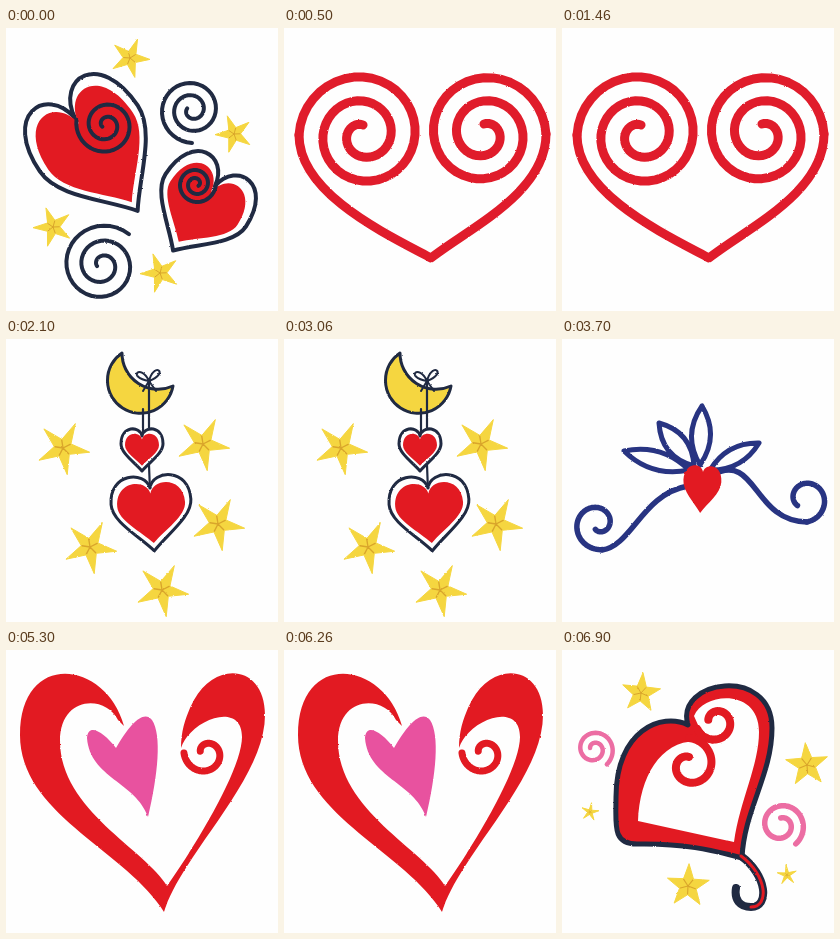
Recreate the animation shown at these times as an HTML page. Size 272 by 283 pixels, loop 8 s.

```html
<!DOCTYPE html>
<html lang="en">
<head>
<meta charset="utf-8">
<title>Embroidered hearts</title>
<style>
  html, body { margin: 0; width: 100%; height: 100%; overflow: hidden; background: #fefefe; }
  #strip { display: block; width: 1632px; height: 283px; animation: cut 8s step-end infinite; }
  path { stroke-linecap: round; stroke-linejoin: round; }
  @keyframes cut {
    0% { transform: translateX(0); }
    6.25% { transform: translateX(-272px); }
    26.25% { transform: translateX(-544px); }
    46.25% { transform: translateX(-816px); }
    66.25% { transform: translateX(-1088px); }
    86.25%, 100% { transform: translateX(-1360px); }
  }
</style>
</head>
<body>
<svg id="strip" viewBox="0 0 1632 283">
  <filter id="thread" x="0" y="0" width="272" height="283" filterUnits="userSpaceOnUse" color-interpolation-filters="sRGB">
    <feTurbulence type="fractalNoise" baseFrequency=".45" numOctaves="2" seed="4"/>
    <feDisplacementMap in="SourceGraphic" scale="1.8" xChannelSelector="R" yChannelSelector="G"/>
  </filter>
</svg>
<script>
const NS = 'http://www.w3.org/2000/svg';
const strip = document.getElementById('strip');
const INK = '#202a42', RED = '#e21a22', CRIMSON = '#e01c2b', BLUE = '#283482';
const PINK = '#ec6da3', GOLD = '#f5d640', WHITE = '#fefefe';
const rad = deg => deg * Math.PI / 180;
let scene;

function node(parent, tag, attrs) {
  const el = document.createElementNS(NS, tag);
  for (const k in attrs) el.setAttribute(k, attrs[k]);
  return parent.appendChild(el);
}

function newScene(i) {
  const slot = node(strip, 'g', { transform: `translate(${i * 272})` });
  scene = node(slot, 'g', { filter: 'url(#thread)' });
}

const shape = (d, color, edge = 'none', width = 0) =>
  node(scene, 'path', { d, fill: color, stroke: edge, 'stroke-width': width });
const line = (d, color, width) => shape(d, 'none', color, width);

// Radius shrinks evenly from r0 to r1; positive turns run clockwise.
function spiral(x, y, r0, r1, start, turns, color, width) {
  const pts = [];
  for (let i = 0; i <= 90; i++) {
    const t = i / 90, r = r0 + (r1 - r0) * t, a = rad(start + 360 * turns * t);
    pts.push(`${x + r * Math.cos(a)},${y + r * Math.sin(a)}`);
  }
  line('M' + pts.join('L'), color, width);
}

// Cleft at (x, y), half width w, cleft-to-tip height h.
function heart(x, y, w, h, turn, lift, color, edge, width, drop = 0) {
  const half = s => `C${s * w * 0.1},${-w * lift} ${s * w},${-w * lift} ${s * w},${h * 0.22}`
    + `C${s * w},${h * 0.5} ${s * w * 0.35},${h * 0.75} 0,${h}`;
  const el = shape(`M0,0${half(-1)}M0,0${half(1)}`, color, edge, width);
  el.setAttribute('transform', `translate(${x} ${y}) rotate(${turn}) translate(0 ${drop})`);
}

function framedHeart(x, y, w, h, turn, lift, gap, width) {
  heart(x, y, w, h, turn, lift, WHITE, INK, width);
  heart(x, y, w - gap, h - gap * 2.2, turn, lift, RED, 'none', 0, gap * 0.9);
}

// Five-pointed star with shaded facets.
function star(x, y, r, turn, inner = 0.35) {
  const at = (i, q) => {
    const a = rad(i * 36 - 90 + turn);
    return [x + q * Math.cos(a), y + q * Math.sin(a)];
  };
  let d = '', folds = '';
  for (let i = 0; i < 10; i++) {
    d += (i ? 'L' : 'M') + at(i, i % 2 ? r * inner : r);
    if (i % 2) folds += `M${x},${y}L${at(i, r * inner * 0.9)}`;
  }
  shape(d + 'Z', GOLD, GOLD, 1);
  line(folds, '#d9a52b', r / 20);
}

// Lens between base and tip.
function petal(bx, by, tx, ty, w) {
  const len = Math.hypot(tx - bx, ty - by);
  const nx = (by - ty) / len * w, ny = (tx - bx) / len * w;
  const mx = (bx + tx) / 2, my = (by + ty) / 2;
  shape(`M${bx},${by}Q${mx + nx},${my + ny} ${tx},${ty}Q${mx - nx},${my - ny} ${bx},${by}Z`, WHITE, BLUE, 5);
}

// Two hearts, two spirals, four stars
newScene(0);
star(124, 30, 20, 22);
star(228, 106, 19, -20);
star(47, 199, 20, -20);
star(154, 245, 20, -20);
framedHeart(69, 90, 59, 112, -34, 0.74, 8, 4);
spiral(100, 97, 30, 4, 190, -2.1, INK, 4);
framedHeart(209, 158, 48, 77, 33, 0.7, 8, 4);
spiral(190, 156, 20, 3, 0, 2.1, INK, 4);
spiral(186, 82, 33, 5, 90, 2.3, INK, 4);
spiral(96, 237, 41, 5, -49, -2.4, INK, 4);

// One heart made of two mirrored spirals
newScene(1);
spiral(79, 107, 64, 10, 180, 2.25, CRIMSON, 9);
spiral(200, 106, 62, 10, 0, -2.25, CRIMSON, 9);
line('M15,107C15,165 100,205 147,230C185,200 262,165 262,106', CRIMSON, 9);

// Moon mobile with hanging hearts
newScene(2);
for (const [x, y] of [[57, 109], [197, 105], [84, 208], [212, 185], [156, 251]]) star(x, y, 27, 27, 0.33);
shape('M116,14A33,33 0 1 0 167,47A36,36 0 0 1 116,14Z', GOLD, INK, 3);
line('M143,42V94M137,70V94M143,126L144,152', INK, 2.2);
line('M143,42C120,38 135,24 143,42C148,22 164,34 143,42L137,52M143,42L150,52', INK, 2);
framedHeart(136, 97, 21, 35, 0, 0.5, 4, 3);
framedHeart(144, 149, 40, 63, -4, 0.45, 6, 3);

// Blue flourish with a red heart
newScene(3);
petal(127, 131, 62, 112, 18);
petal(132, 127, 97, 84, 20);
petal(138, 126, 140, 67, 19);
petal(148, 131, 197, 104, 16);
line('M126,147C80,155 70,207 40,211', BLUE, 5.5);
spiral(36, 185, 26, 6, 80, 1.1, BLUE, 5.5);
line('M150,136C195,112 190,182 245,183', BLUE, 5.5);
spiral(243, 160, 23, 10, 85, -0.85, BLUE, 5.5);
heart(141, 133, 19, 41, 4, 0.5, RED);

// Bold heart around a pink heart
newScene(4);
shape('M118,76C100,10 14,0 14,85C14,165 120,200 158,262C175,205 259,130 259,65'
  + 'C259,15 210,10 188,50C180,65 175,80 175,98C184,70 236,50 236,87'
  + 'C236,115 200,180 161,236C140,200 54,160 54,91C54,45 100,45 112,70Z', RED);
spiral(200, 103, 22, 6, 180, -0.95, RED, 7);
shape('M110,98C98,82 82,72 81,88C84,128 130,132 142,167C152,125 156,85 146,70C138,60 125,72 110,98Z', '#e8529f');

// Tilted heart with small stars and pink curls
newScene(5);
star(79, 43, 20, 6, 0.4);
star(245, 115, 22, -4, 0.4);
star(126, 236, 22, 3, 0.4);
star(28, 162, 9, 10, 0.28);
star(225, 225, 10, -5, 0.28);
line('M179,206C205,225 208,257 189,257C178,257 172,250 174,238', INK, 8);
shape('M126,75C112,30 210,15 210,78C210,125 182,160 180,208C150,200 120,193 75,194'
  + 'C50,194 54,175 54,147C54,80 100,62 126,75Z', RED, INK, 5);
shape('M132,66C142,42 197,38 197,82C197,115 178,150 172,192L76,171C78,120 105,80 152,94L140,84Z', WHITE);
spiral(154, 72, 20, 8, 160, -0.9, RED, 8);
spiral(127, 115, 27, 8, -90, 1, RED, 8);
line('M179,206C205,225 208,257 189,257', RED, 3);
spiral(32, 99, 20, 4, 50, -1.6, PINK, 4.5);
spiral(219, 175, 24, 7, 52, -1.4, PINK, 5.5);
</script>
</body>
</html>
```
